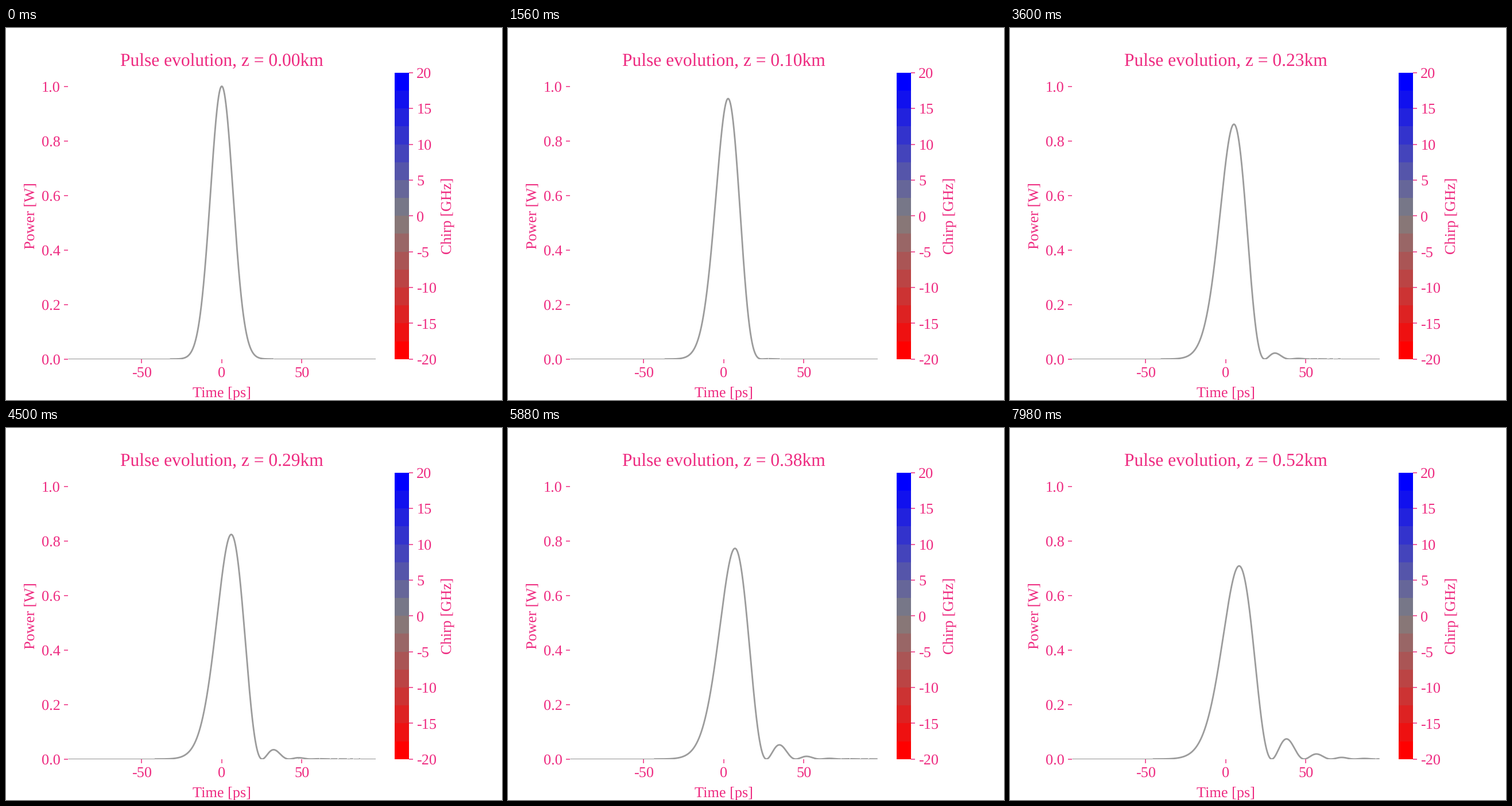
A matplotlib script that plays this animation: 864x648 px, repeating every 8000 ms.

```python
import numpy as np
import matplotlib.pyplot as plt
from matplotlib.animation import FuncAnimation
from matplotlib.cm import ScalarMappable
from matplotlib.colors import LinearSegmentedColormap, Normalize

PINK = "#ee2a80"
plt.rcParams.update({
    "font.family": "Liberation Serif", "font.size": 14,
    "text.hinting": "none", "axes.unicode_minus": False,
    "text.color": PINK, "axes.labelcolor": PINK,
    "xtick.color": PINK, "ytick.color": PINK,
})

# Gaussian pulse under pure third-order dispersion (ps, km)
WIDTH = 10.0
BETA3 = 6000.0
DZ = 1 / 256
N, DT, T_MAX = 2 ** 13, 0.09375, 96.0
FLAT = 1.8e-5  # slope in W/ps below which the curve lies on the axis
TICK_MS, HOLD, TICKS = 20, 3, 400

t = (np.arange(N) - N // 2) * DT
omega = 2 * np.pi * np.fft.fftfreq(N, DT)
spectrum = np.fft.fft(np.exp(-t ** 2 / (2 * WIDTH ** 2)))
view = np.abs(t) <= T_MAX
t_view = t[view]


def power(z):
    field = np.fft.ifft(spectrum * np.exp(-1j * BETA3 * omega ** 3 * z / 6))
    return np.abs(field[view]) ** 2


def keep(values, inside):
    """Blank every point that belongs to no segment marked as inside."""
    shown = np.append(inside, False) | np.append(False, inside)
    return np.where(shown, values, np.nan)


fig, ax = plt.subplots(figsize=(6.4, 4.8), dpi=135)
ax.set_xlim(-T_MAX, T_MAX)
ax.set_ylim(0, 1.05)
ax.set_xticks([-50, 0, 50])
ax.set_yticks(np.arange(6) / 5)
ax.set_xlabel("Time [ps]", labelpad=5.9)
ax.set_ylabel("Power [W]")
ax.spines[:].set_visible(False)
title = ax.set_title("Pulse evolution, z = 0.00km")

cmap = LinearSegmentedColormap.from_list(
    "chirp", [(1, 0, 0), (0.5, 0.5, 0.5), (0, 0, 1)], N=16)
bar = fig.colorbar(ScalarMappable(Normalize(-20, 20), cmap), ax=ax,
                   ticks=np.arange(-20, 21, 5), label="Chirp [GHz]")
bar.outline.set_visible(False)

base, = ax.plot([], [], color="#888888", lw=1.5, solid_capstyle="butt",
                snap=True)
curve, = ax.plot([], [], color="#9c9c9c", lw=1.5, solid_capstyle="butt",
                 snap=False)


def update(tick):
    z = tick // HOLD * DZ
    p = power(z)
    flat = (np.abs(np.diff(p)) < FLAT * DT) & (p[1:] < 0.01)
    base.set_data(t_view, keep(0 * p, flat))
    curve.set_data(t_view, keep(p, ~flat))
    title.set_text(f"Pulse evolution, z = {z:.2f}km")
    return base, curve, title


anim = FuncAnimation(fig, update, frames=TICKS, interval=TICK_MS,
                     init_func=lambda: update(0), repeat=True, repeat_delay=0)
plt.show()
```
